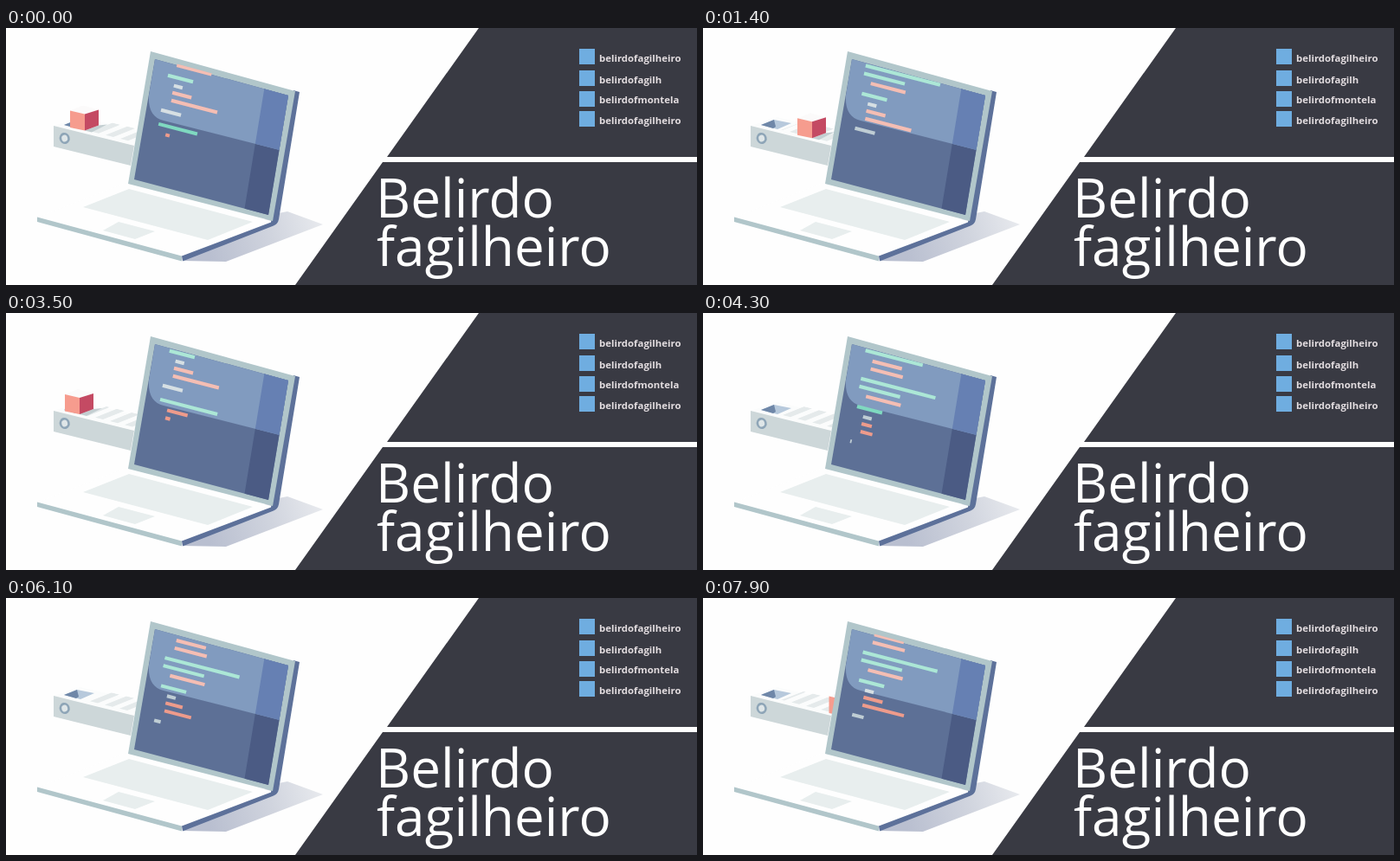
Animation of 798x297 px, one loop 8000 ms. Source, as an HTML page:

```html
<!DOCTYPE html>
<html lang="pt">
<head>
<meta charset="utf-8">
<title>Belirdo fagilheiro</title>
<style>
  html, body { margin: 0; width: 100%; height: 100%; overflow: hidden; background: #fefefe; }
  svg { display: block; width: 100vw; height: 100vh; }
  text { font-family: "Open Sans", "Noto Sans", sans-serif; }
  .name { font-size: 62px; font-weight: 500; fill: #fff; }
  .handle { font-size: 11.4px; font-weight: 700; fill: #e3dde0; }
  .code path { fill: none; stroke-width: 4; }
</style>
</head>
<body>
<svg viewBox="0 0 798 297">
  <defs>
    <clipPath id="screen"><path d="M172 36 326 78 303 216 148 175Z"/></clipPath>
    <clipPath id="rows"><path d="M172 34.5 326 76.5 303 216 148 175Z"/></clipPath>
    <clipPath id="glare"><path d="M172 34 327 76 316 141 182 107C170 104 164 95 165 78Z"/></clipPath>
    <clipPath id="belt"><path d="M90 118 116 108 160 118 150 136Z"/></clipPath>
    <clipPath id="pit"><path d="M0 0H200V110H102L86 117 67 112H0Z"/></clipPath>
    <linearGradient id="shade" gradientUnits="userSpaceOnUse" x1="235" y1="262" x2="366" y2="226">
      <stop offset="0" stop-color="#b9bfd0"/>
      <stop offset=".55" stop-color="#d0d4de"/>
      <stop offset="1" stop-color="#e8eaee"/>
    </linearGradient>
  </defs>

  <rect width="798" height="297" fill="#fefefe"/>
  <path fill="#393a43" d="M546 0H798V149H440ZM435 155H798V297H334Z"/>

  <!-- conveyor -->
  <path fill="#fbfcfc" d="M55 113 86 103 150 118V137Z"/>
  <g clip-path="url(#belt)"><path id="stripes" fill="#e5eaeb"/></g>
  <path fill="#cdd7d9" d="M55 113 148 136 144 159 55 137Z"/>
  <ellipse cx="67.7" cy="127.5" rx="4.7" ry="5.3" fill="#dfe6e8" stroke="#8ea5b7" stroke-width="2.6" transform="rotate(-15 67.7 127.5)"/>
  <path fill="#b7c9dc" d="M67 112 82 106 102 110 86 117Z"/>
  <path fill="#6f87a8" d="M67 112 82 106 84 114 81 116Z"/>

  <g id="sink">
    <g id="cube">
      <path id="cast" fill="#c3ced1" d="M85 117 101 111 111 110 93 119Z"/>
      <path fill="#fbfafa" d="M68 94 83 88 101 93 85 98Z"/>
      <path fill="#f69c8e" d="M68 94 85 98V117L68 113.5Z"/>
      <path fill="#c44a63" d="M85 98 101 93V111L85 117Z"/>
    </g>
  </g>

  <!-- laptop -->
  <path fill="url(#shade)" d="M204 269 254 270 366 227 325 212 310 215Z"/>
  <path fill="#fefefe" d="M36 219 141 178 310 224 203 264Z"/>
  <path fill="#b1c6ca" d="M36 218.5 203 263.5V269.5L36 224Z"/>
  <path fill="#5d719a" d="M203 263.5 306 224.5 332 72 339 74 315 221Q314 226.500 309 228.500L204 269.500Z"/>
  <path fill="#e8eeee" d="M89 207 142 186 285 224 233 245Z"/>
  <path fill="#e8eeee" d="M112 234 130 224 172 235 149 244Z"/>
  <path fill="#b1c6ca" d="M167 27 334 73 308 223 141 180Z"/>
  <g clip-path="url(#screen)">
    <path fill="#5d7096" d="M140 20H340V230H140Z"/>
    <path fill="#4b5b84" d="M300 60H340V230H272Z"/>
    <g clip-path="url(#glare)">
      <path fill="#819bbf" d="M140 20H340V230H140Z"/>
      <path fill="#6680b3" d="M300 60H340V230H272Z"/>
    </g>
  </g>
  <g class="code" clip-path="url(#rows)">
    <path id="G" stroke="#7fd9c0"/>
    <path id="P" stroke="#ee9b8b"/>
    <path id="W" stroke="#bfcdd4"/>
    <g clip-path="url(#glare)"><path id="lit" stroke="#fff" stroke-opacity=".35"/></g>
  </g>

  <g fill="#6fade0">
    <rect x="662" y="24" width="18" height="18"/>
    <rect x="662" y="49" width="18" height="18"/>
    <rect x="662" y="73" width="18" height="18"/>
    <rect x="662" y="96" width="18" height="18"/>
  </g>
  <text class="handle" x="685" y="39">belirdofagilheiro</text>
  <text class="handle" x="685" y="64">belirdofagilh</text>
  <text class="handle" x="685" y="87">belirdofmontela</text>
  <text class="handle" x="685" y="111">belirdofagilheiro</text>
  <text class="name" x="427" y="219">Belirdo</text>
  <text class="name" x="428" y="275">fagilheiro</text>
</svg>
<script>
  const LOOP = 8000, CYCLE = 1700, STEP = 100, CYCLE_ROWS = 121;
  const $ = id => document.getElementById(id);

  // colour, indent, row, length, typing start, typing time
  const LINES = [
    ['G', 0, 0, 29, -1160, 200],
    ['W', 8.5, 9.7, 10, -1050, 150],
    ['P', 8.2, 17.9, 22, -950, 280],
    ['P', 8.5, 26.8, 53, -880, 310],
    ['W', -1.1, 40.3, 23, -830, 400],
    ['G', -1.2, 56.5, 66, -210, 310],
    ['P', 8.5, 66.5, 34, -25, 180],
    ['P', 8, 75.5, 37, 70, 200],
    ['G', -1, 89, 86, 140, 310],
    ['G', -1.3, 98.1, 47, 280, 300],
    ['P', 8, 107.3, 40, 390, 250]
  ];
  const SCROLL = [[0, 0], [100, 11], [300, 28.3], [900, 67.7], [1100, 81], [1400, 100], [1700, CYCLE_ROWS]];
  const SLIDE = [[900, 186], [1100, 162], [1400, 125.5], [1700, 90.5], [1800, 84.5]];

  const clamp = v => Math.min(1, Math.max(0, v));

  function follow(points, t) {
    let i = 1;
    while (i < points.length - 1 && t > points[i][0]) i++;
    const [t0, v0] = points[i - 1], [t1, v1] = points[i];
    return v0 + (v1 - v0) * clamp((t - t0) / (t1 - t0));
  }

  function drawCode(phase) {
    const paths = { G: '', P: '', W: '' };
    const scroll = follow(SCROLL, phase);
    for (let n = -1; n <= 1; n++) {
      for (const [color, indent, row, length, start, time] of LINES) {
        const w = length * clamp((phase - n * CYCLE - start) / time);
        const v = row + n * CYCLE_ROWS - scroll;
        if (w <= 0 || v < -40) continue;
        const x = 187 + indent - 0.17 * v;
        const y = 54.7 + 0.26 * indent + v;
        paths[color] += `M${x.toFixed(2)} ${y.toFixed(2)}l${w.toFixed(2)} ${(w * 0.26).toFixed(2)}`;
      }
    }
    for (const color in paths) $(color).setAttribute('d', paths[color]);
    $('lit').setAttribute('d', paths.G + paths.P + paths.W);
  }

  function drawBelt(phase) {
    const pitch = 17;
    const shift = ((-0.12 * (phase - 900)) % pitch + pitch) % pitch;
    let d = '';
    for (let i = -2; i < 5; i++) {
      const x = 92 + shift + i * pitch;
      d += `M${x} ${118 + (x - 92) * 0.25}l25 -10 9 2.2 -25 10Z`;
    }
    $('stripes').setAttribute('d', d);
  }

  function drawCube(phase) {
    const sinking = phase > 100 && phase < 500;
    const x = follow(SLIDE, phase <= 500 ? phase + CYCLE : phase) - 84.5;
    const drop = sinking ? 21 * ((phase - 100) / 200) ** 2 : 0;
    $('cube').setAttribute('transform', `translate(${x} ${x * 0.25 + drop})`);
    $('cube').setAttribute('visibility', phase >= 500 && phase < 900 ? 'hidden' : 'inherit');
    $('cast').setAttribute('opacity', sinking ? 0 : 1);
    if (sinking) $('sink').setAttribute('clip-path', 'url(#pit)');
    else $('sink').removeAttribute('clip-path');
  }

  function draw(ms) {
    const t = Math.floor((ms % LOOP) / STEP) * STEP;
    const phase = t % CYCLE;
    drawBelt(phase);
    drawCube(phase);
    drawCode(phase);
  }

  let origin;
  function tick(now) {
    origin ??= now;
    draw(now - origin);
    requestAnimationFrame(tick);
  }
  draw(0);
  requestAnimationFrame(tick);
</script>
</body>
</html>
```
